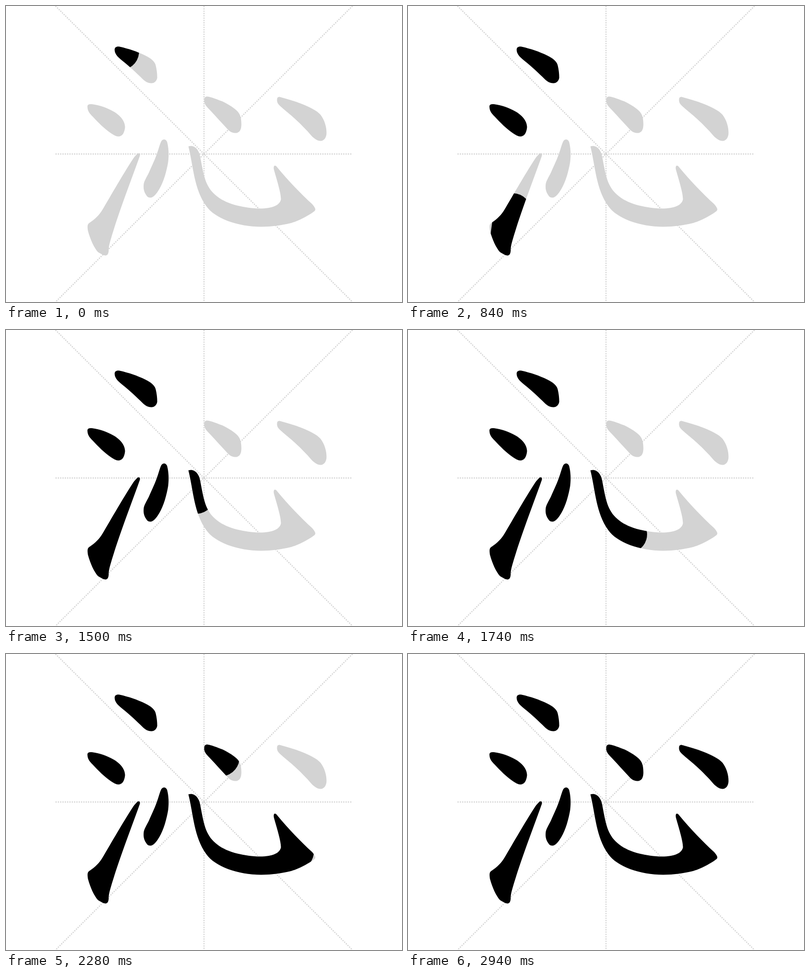
An HTML page with a canvas that plays this animation: 800x600 px, repeating every 3060 ms.

```html
<!DOCTYPE html>
<html lang="zh">
<head>
<meta charset="utf-8">
<title>Stroke order</title>
<style>
html, body { margin: 0; width: 100%; height: 100%; overflow: hidden; background: #fff; }
canvas { display: block; }
</style>
</head>
<body>
<canvas id="stage" width="800" height="600"></canvas>
<script>
const ctx = document.getElementById('stage').getContext('2d');
const LOOP = 3060, STEP = 60, LAST = 49, PEN = 75;
const GRAY = '#d3d3d3';
const DOT = 600 / 256; // the grid is 256 dots wide

// Each stroke: outline, pen path, and the steps at which the pen starts and stops.
const strokes = [
  {
    shape: 'M219,88C219,83 223,81 229,82C247,86 265,92 281,100C293,106 300,112 302,120C304,128 305,137 305,145C304,151 300,156 293,156C287,156 281,153 276,148C263,135 248,121 234,110C224,102 219,96 219,88Z',
    pen: [[222, 87], [250, 102], [283, 127]],
    from: -0.6, to: 3.8
  },
  {
    shape: 'M164,203C164,199 168,198 173,198.5C190,201 204,206 216,213C229,220 240,232 240,245C239,256 235,264 226,264C222,264 217,261 211,257C198,248 186,236 175,224C168,217 164,212 164,203Z',
    pen: [[168, 203], [195, 216], [220, 240]],
    from: 4, to: 8
  },
  {
    shape: 'M264,300C266,297 271,297 270,303C260,332 235,397 218,450C208,482 207,487 207,495C206,508 200,508 185,498C178,490 170,474 165,455C163,442 165,441 171,437C185,427 190,420 197,408C218,372 240,334 257,308C260,304 262,302 264,300Z',
    pen: [[199, 499], [210, 419], [240, 352], [254, 328]],
    from: 9, to: 19.5, power: 1.05
  },
  {
    shape: 'M313,274C316,269 322,268 325,275C328,287 329,301 327,316C324,334 318,356 309,371C303,381 297,388 291,388C286,388 284,385 281,380C277,373 277,365 278,359C280,351 286,343 290,333C297,318 304,302 308,288C310,282 311,278 313,274Z',
    pen: [[318, 285], [314, 304], [299, 353]],
    from: 18.9, to: 23
  },
  {
    shape: 'M368,284C380,280 390,291 392,306C399,343 402,365 423,383C442,400 475,408 507,410C536,411 553,404 555,391C555,378 546,350 541,332C539,324 542,320 547,326C570,354 596,381 618,401C624,408 626,412 623,415C613,423 590,436 573,440C555,444 537,447 515,447C468,447 421,430 404,405C379,370 378,324 368,284Z',
    pen: [[372, 288], [385, 340], [403, 383], [420, 400], [442, 413], [480, 424],
          [515, 428], [560, 421], [584, 400], [557, 351]],
    from: 22.7, to: 35.9, power: 1.15, filled: LAST
  },
  {
    shape: 'M400,190C400,185 402,183 406,183C415,184 426,189 437,193C449,199 461,206 468,214C474,221 475,230 475,240C475,249 472,257 463,257C456,257 450,253 446,248C435,236 424,224 412,211C404,203 399,197 400,190Z',
    pen: [[405, 188], [432, 208], [453, 234]],
    from: 35.9, to: 39.8
  },
  {
    shape: 'M547,190C547,185 549,183 553,184C567,188 582,192 597,198C612,204 627,211 635,220C643,231 647,244 647,257C647,266 642,273 635,273C629,273 623,269 617,263C607,251 594,238 582,227C572,218 563,211 553,202C549,198 547,195 547,190Z',
    pen: [[553, 190], [604, 215], [627, 247]],
    from: 41.2, to: 47.3
  }
];

for (const s of strokes) {
  s.outline = new Path2D(s.shape);
  s.track = new Path2D();
  s.length = 0;
  s.pen.forEach(([x, y], i) => {
    s.track.lineTo(x, y);
    if (i) s.length += Math.hypot(x - s.pen[i - 1][0], y - s.pen[i - 1][1]);
  });
}

function line(x1, y1, x2, y2) {
  ctx.beginPath();
  ctx.moveTo(x1, y1);
  ctx.lineTo(x2, y2);
  ctx.stroke();
}

function drawGrid() {
  ctx.save();
  ctx.strokeStyle = GRAY;
  ctx.lineWidth = DOT;
  ctx.setLineDash([DOT, DOT]);
  line(100, 0, 700, 600);
  line(700, 0, 100, 600);
  line(400, 0, 400, 600);
  line(100, 300, 700, 300);
  ctx.restore();
}

function drawStroke(s, step) {
  const full = step >= (s.filled || s.to);
  ctx.fillStyle = full ? '#000' : GRAY;
  ctx.fill(s.outline);
  if (full || step < s.from) return;
  const u = Math.min(1, (step - s.from) / (s.to - s.from));
  const reach = s.length * Math.pow(u, s.power || 1);
  ctx.save();
  ctx.clip(s.outline);
  ctx.lineWidth = PEN;
  ctx.lineCap = ctx.lineJoin = 'round';
  ctx.strokeStyle = '#000';
  ctx.setLineDash([Math.max(0.01, reach), 2000]);
  ctx.stroke(s.track);
  ctx.restore();
}

const start = performance.now();

function draw() {
  const t = (performance.now() - start) % LOOP;
  const step = Math.min(LAST, Math.floor(t / STEP));
  ctx.fillStyle = '#fff';
  ctx.fillRect(0, 0, 800, 600);
  drawGrid();
  ctx.save();
  ctx.translate(0.5, 0.5);
  for (const s of strokes) drawStroke(s, step);
  ctx.restore();
  requestAnimationFrame(draw);
}
draw();
</script>
</body>
</html>
```
